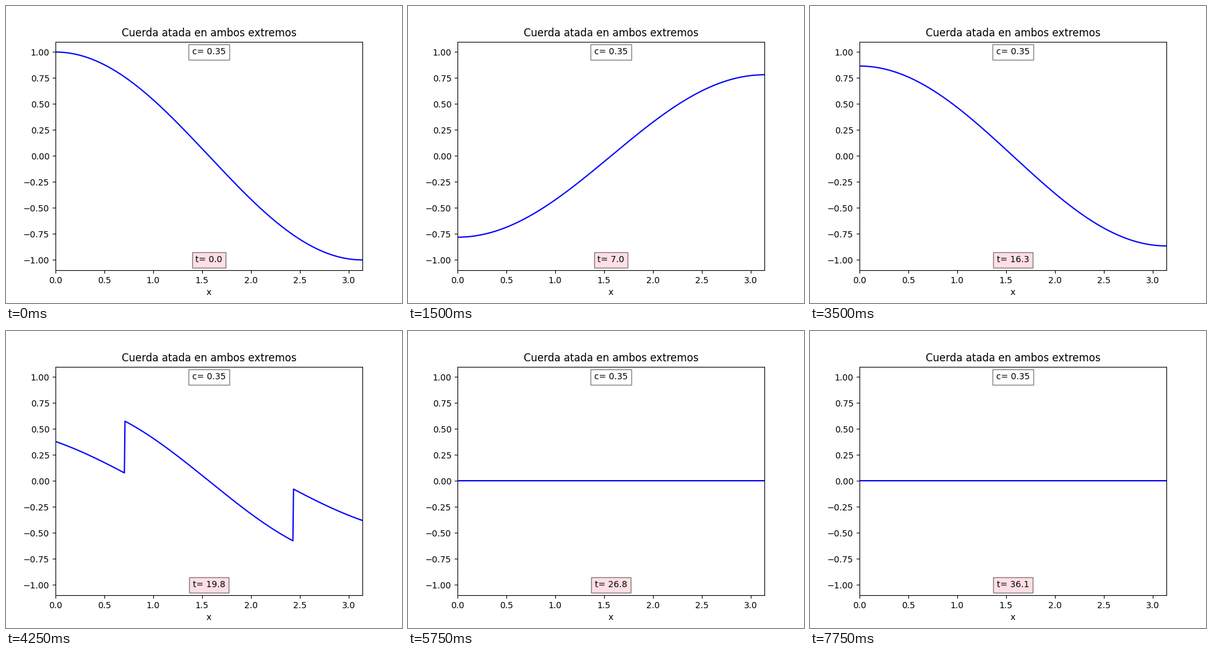
A matplotlib script that plays this animation: 640 px wide and 480 px high, repeating every 8000 ms.

```python
import numpy as np
import matplotlib.pyplot as plt
from matplotlib.animation import FuncAnimation

FRAMES = 32
INTERVAL = 250
SPEED = np.sqrt(1 / 8)
DT = 57 / 49

plt.rcParams["font.family"] = "DejaVu Sans"
x = np.linspace(0, np.pi, 500)


def profile(s):
    """Initial shape, known only between -2 pi and 3 pi."""
    return np.where((s >= -2 * np.pi) & (s <= 3 * np.pi), np.cos(s), 0)


def wave(t):
    """D'Alembert solution: two half-height waves moving apart."""
    shift = SPEED * t
    return (profile(x - shift) + profile(x + shift)) / 2


fig, ax = plt.subplots(figsize=(6.4, 4.8), dpi=100)
ax.set_xlim(0, np.pi)
ax.set_ylim(-1.1, 1.1)
ax.set_title("Cuerda atada en ambos extremos")
ax.set_xlabel("x")

# Faint dots where the grid lines would cross
gx, gy = np.meshgrid(np.arange(0.5, 3.1, 0.5), np.arange(-1, 1.1, 0.25))
ax.plot(gx.ravel(), gy.ravel(), ",", color="#e4e4e4", zorder=1)

line, = ax.plot(x, wave(0), color="blue", lw=1.5)


def boxed(y, text, face):
    return ax.text(np.pi / 2, y, text, ha="center", va="center",
                   bbox=dict(facecolor=face, alpha=0.5))


boxed(1, f"c= {SPEED:.2f}", "white")
clock = boxed(-1, "t= 0.0", "pink")


def update(i):
    t = i * DT
    line.set_ydata(wave(t))
    clock.set_text(f"t= {t:.1f}")
    return line, clock


anim = FuncAnimation(fig, update, frames=FRAMES, interval=INTERVAL,
                     repeat=True, repeat_delay=0)
plt.show()
```
